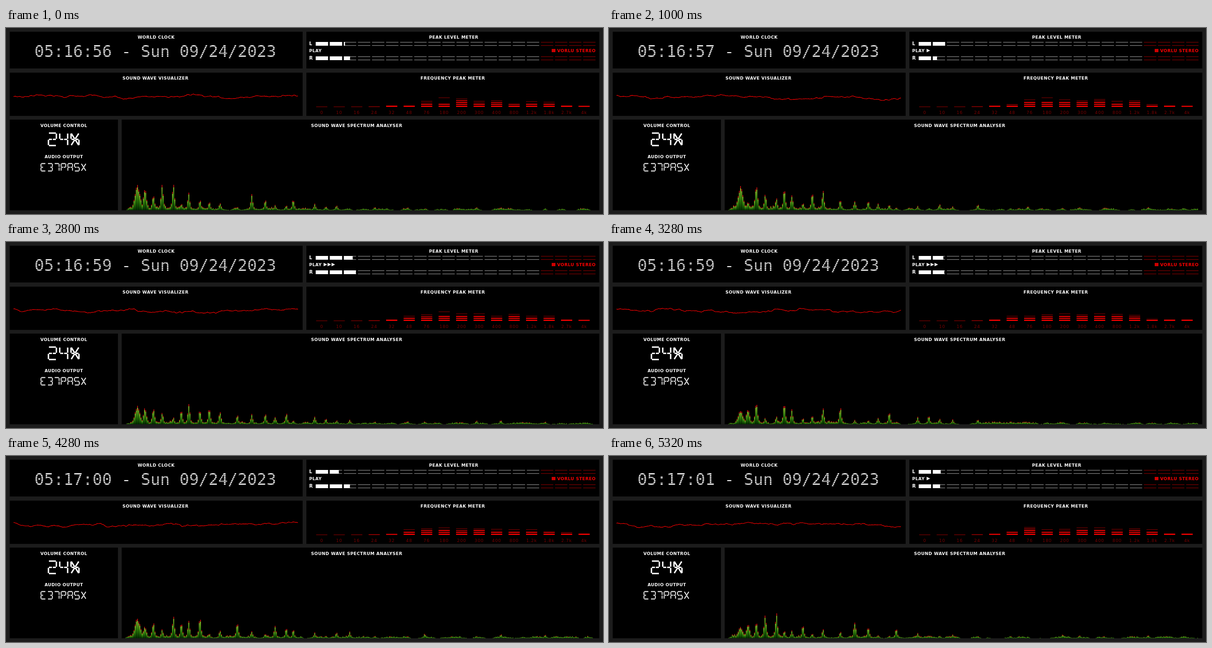
These frames come from a looping animation (1280 px wide and 400 px high, 5.36 s). An HTML page with a canvas:

```html
<!DOCTYPE html>
<html lang="en">
<head>
<meta charset="utf-8">
<title>Audio dashboard</title>
<style>
html, body { margin: 0; width: 100%; height: 100%; overflow: hidden; background: #1c1c1c; }
canvas, svg { position: absolute; left: 0; top: 0; width: 1280px; height: 400px; }
text { font: bold 9px "DejaVu Sans", sans-serif; letter-spacing: .5px; fill: #fff; }
.mid { text-anchor: middle; }
.brand { text-anchor: end; fill: #f00; }
.band { text-anchor: middle; fill: #780000; font-weight: normal; letter-spacing: .9px; }
.side { font-size: 10px; }
</style>
</head>
<body>
<canvas id="stage" width="1280" height="400"></canvas>
<svg id="labels" viewBox="0 0 1280 400"></svg>
<script>
const LOOP = 5360;
const ctx = document.getElementById('stage').getContext('2d');
const svg = document.getElementById('labels');

// ---- seeded randomness ----
const rand = n => { const v = Math.sin(n * 12.9898 + 4.1) * 43758.5453; return v - Math.floor(v); };
const lerp = (a, b, p) => a + (b - a) * p;
function noise(x, seed) {
  const i = Math.floor(x), f = x - i;
  return lerp(rand(i + seed * 91.7), rand(i + 1 + seed * 91.7), f * f * (3 - 2 * f));
}
// Noise over x that also drifts smoothly with time.
function drift(x, time, seed) {
  const k = Math.floor(time);
  return lerp(noise(x, seed + k), noise(x, seed + k + 1), time - k);
}

// ---- static labels ----
function label(x, y, str, cls) {
  const el = document.createElementNS('http://www.w3.org/2000/svg', 'text');
  el.setAttribute('x', x);
  el.setAttribute('y', y);
  el.setAttribute('class', cls);
  el.textContent = str;
  svg.append(el);
}
label(322, 23, 'WORLD CLOCK', 'mid');
label(960, 23, 'PEAK LEVEL METER', 'mid');
label(320.5, 111, 'SOUND WAVE VISUALIZER', 'mid');
label(958, 111, 'FREQUENCY PEAK METER', 'mid');
label(124, 213, 'VOLUME CONTROL', 'mid');
label(752, 213, 'SOUND WAVE SPECTRUM ANALYSER', 'mid');
label(124, 280, 'AUDIO OUTPUT', 'mid');
label(650, 37, 'L', 'side');
label(650, 68, 'R', 'side');
label(650, 52, 'PLAY', '');
label(1264.5, 52, 'VORLU STEREO', 'brand');
const BANDS = '0 10 16 24 32 48 76 180 200 300 400 800 1.2k 1.8k 2.7k 4k'.split(' ');
const bandX = i => 677 + 37.5 * i;
BANDS.forEach((name, i) => label(bandX(i), 185, name, 'band'));

// ---- segment display: a-f rim, g h middle, i j k m diagonals ----
const SEGMENT = {
  a: '0020', b: '2022', c: '2224', d: '0424', e: '0204', f: '0002',
  g: '0212', h: '1222', i: '0012', j: '2012', k: '0412', m: '2412'
};
const LIT = {
  2: 'abghed', 3: 'abhcd', 4: 'fghbc', 5: 'afghcd', 7: 'abc',
  E: 'afged', P: 'abfghe', A: 'abcefgh', '%': 'fgijkmhc', x: 'ijkm'
};

function segText(str, x0, y0, ux, uy, pitch, weight) {
  ctx.strokeStyle = '#fff';
  ctx.lineWidth = weight;
  ctx.beginPath();
  [...str].forEach((ch, n) => {
    for (const name of LIT[ch]) {
      const [ax, ay, bx, by] = [...SEGMENT[name]].map((v, k) => k % 2 ? y0 + v * uy : x0 + pitch * n + v * ux);
      const gap = weight * .35 / Math.hypot(bx - ax, by - ay);
      ctx.moveTo(lerp(ax, bx, gap), lerp(ay, by, gap));
      ctx.lineTo(lerp(bx, ax, gap), lerp(by, ay, gap));
    }
  });
  ctx.stroke();
}

// Clock type is cut into rows like a dot matrix.
function clock(str) {
  ctx.font = '34.45px "DejaVu Sans Mono", monospace';
  ctx.fillStyle = '#fff';
  ctx.fillText(str, 61, 62);
  ctx.fillStyle = '#000';
  for (let r = 0; r < 8; r++) ctx.fillRect(56, 39.6 + r * 3.7, 530, 1.1);
}

// ---- stepped time: nine updates in every 600 ms ----
const STEPS = [0, 40, 120, 200, 240, 320, 400, 440, 520];
function tick(t) {
  if (t < 80) return { at: 0, n: 0 };
  const k = Math.floor((t - 80) / 600), off = t - 80 - k * 600;
  const i = STEPS.filter(s => s <= off).length - 1;
  return { at: 80 + k * 600 + STEPS[i], n: 1 + k * 9 + i };
}

// ---- parts ----
function panels() {
  ctx.fillStyle = '#1c1c1c';
  ctx.fillRect(0, 0, 1280, 400);
  ctx.fillStyle = '#000';
  for (const [y, h] of [[8, 79], [96, 93]])
    for (const x of [8, 644]) ctx.fillRect(x, y, 628, h);
  ctx.fillRect(8, 197, 232, 195);
  ctx.fillRect(248, 197, 1024, 195);
}

function meter(y, end) {
  for (let i = 0; i < 20; i++) {
    const x = 664 + 30.18 * i, hot = i > 15;
    ctx.fillStyle = hot ? '#800000' : '#8c8c8c';
    ctx.fillRect(x, y, 26.5, 1.2);
    ctx.fillRect(x, y + 7, 26.5, 1.2);
    ctx.fillStyle = hot ? '#f00' : '#fff';
    const w = Math.min(26.5, end - x);
    if (w > 0) ctx.fillRect(x, y, w, 8);
  }
}

function arrows(count) {
  ctx.fillStyle = '#fff';
  for (let i = 0; i < count; i++) {
    const x = 681 + 8.5 * i;
    ctx.beginPath();
    ctx.moveTo(x, 44.8);
    ctx.lineTo(x + 7.5, 48.5);
    ctx.lineTo(x, 52.2);
    ctx.fill();
  }
}

function wave(n) {
  ctx.strokeStyle = '#f00';
  ctx.lineWidth = 1.1;
  ctx.beginPath();
  for (let x = 16; x <= 627; x += 2) {
    const octave = (size, amp) => (noise(x / size, n + size) - .5) * amp;
    ctx.lineTo(x, 148.5 + octave(85, 8) + octave(18, 6) + octave(6, 3) + octave(2, 1));
  }
  ctx.stroke();
}

const sigmoid = v => 1 / (1 + Math.exp(-v));
function bands(n, t) {
  for (let i = 0; i < 16; i++) {
    const x = bandX(i) - 12;
    const shape = 2.6 * sigmoid((i - 4.8) * 1.8) * sigmoid((13.2 - i) * .9);
    const h = 4 * shape * (.6 + .8 * noise(n / 4, i + 20));
    const held = i === 7 && t < 3080;
    ctx.fillStyle = '#900000';
    ctx.fillRect(x, 169, 24, 1);
    if (held || h > 6) ctx.fillRect(x, held ? 149.5 : Math.floor(166 - h), 24, 1);
    ctx.fillStyle = '#f00';
    for (let row = 0; row < h; row += 4) {
      const rowH = Math.min(2, h - row);
      ctx.fillRect(x, 169 - row - rowH, 24, rowH);
    }
  }
}

const green = ctx.createLinearGradient(0, 0, 0, -1);
green.addColorStop(0, '#023000');
green.addColorStop(.5, '#2f8a0a');
green.addColorStop(1, '#8fc02c');

// Resonances that keep flaring up along the spectrum.
const NOTES = [281, 297, 315, 334, 358, 375, 391, 415, 435, 458, 495, 526, 555, 576, 600,
  615, 661, 685, 708, 736, 790, 860, 897, 972, 1008, 1060, 1155];

function spectrum(n) {
  const peaks = NOTES.map((x, i) => ({
    x,
    h: (9 + 44 * Math.exp(-(((x - 281) / 310) ** 2))) * (.2 + .9 * noise(n / 5, i + 300)),
    w: 3 + 5 * Math.exp((281 - x) / 15)
  }));
  for (let i = 0; i < 403; i++) {
    const x = 256 + i * 2.5;
    const edge = Math.min(1, (x - 254) / 18);
    const swell = Math.max(0, drift(x / 14, n / 5, 500) * 1.4 - .3);
    let h = (4.5 + 9 * Math.exp((270 - x) / 140)) * swell * (.5 + .8 * rand(i + n * 411));
    for (const p of peaks) {
      const d = Math.abs(x - p.x);
      h = Math.max(h, p.h * (.7 * Math.exp(-((d / p.w) ** 2)) + .3 * Math.exp(-d / 9)));
    }
    h *= edge * (.92 + .16 * rand(i * 3 + n * 11));
    if (h < .6) continue;
    const cap = h > 4 ? 1 + h * .08 : 0;
    ctx.fillStyle = '#a80c0c';
    ctx.fillRect(x, 392 - h, 2, cap);
    ctx.save();
    ctx.translate(x, 392);
    ctx.scale(1, h - cap);
    ctx.fillStyle = green;
    ctx.fillRect(0, -1, 2, 1);
    ctx.restore();
  }
}

function draw(time) {
  const { at, n } = tick(time);
  const passed = Math.max(0, Math.floor((at - 560) / 1000) + 1);
  const secs = 56 + passed;
  const two = v => String(v).padStart(2, '0');
  const level = seed => 702 + 52 * noise(n / 3, seed);

  panels();
  clock(`05:${16 + Math.floor(secs / 60)}:${two(secs % 60)} - Sun 09/24/2023`);
  meter(30, level(5));
  meter(61, level(6));
  arrows(passed % 4);
  ctx.fillStyle = '#d00000';
  ctx.fillRect(1170, 45, 8, 7);
  wave(n);
  bands(n, at);
  segText('24%', 91, 226, 8.5, 6.7, 24.2, 3);
  segText('E37PA5x', 75, 291.5, 5, 4, 14.4, 1.8);
  spectrum(n);
}

const start = performance.now();
function loop() {
  draw((performance.now() - start) % LOOP);
  requestAnimationFrame(loop);
}
loop();
</script>
</body>
</html>
```
